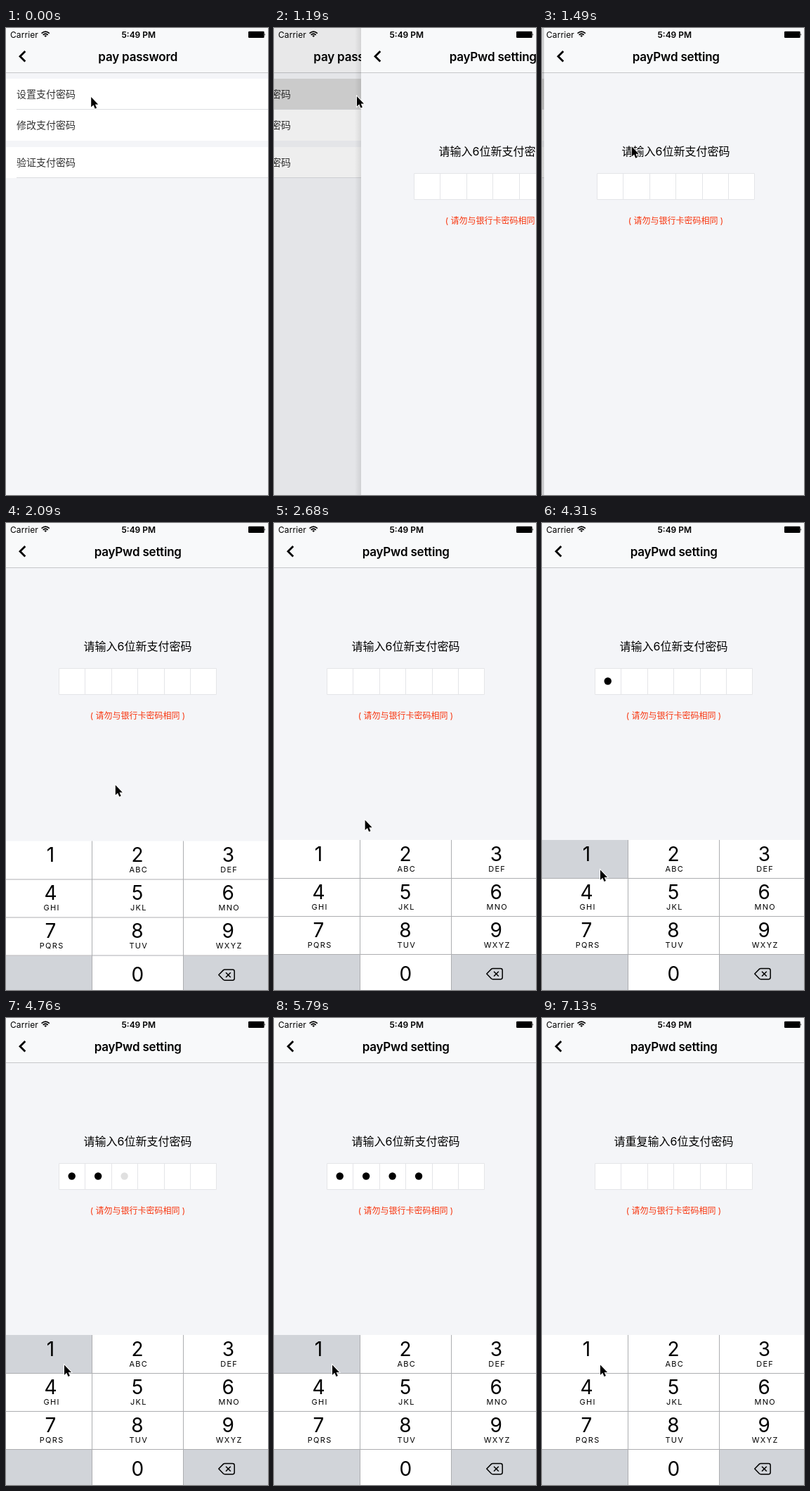
These frames come from a looping animation (373x663 px, 8000 ms). An HTML page:

```html
<!DOCTYPE html>
<html lang="zh-CN">
<head>
<meta charset="utf-8">
<title>pay password</title>
<style>
html, body { margin: 0; width: 100%; height: 100%; overflow: hidden; background: #f4f5f8; }
svg { display: block; width: 373px; height: 663px; }
text { font-family: Inter, "Noto Sans CJK SC", "Noto Sans CJK", sans-serif; fill: #000; }
.mid { text-anchor: middle; }
.title { font-size: 17px; font-weight: 600; letter-spacing: -.2px; }
.status { font-size: 12px; }
.row { font-size: 14px; fill: #333; }
.prompt { font-size: 16px; }
.note { font-size: 12px; fill: #f8350e; }
.digit { font-size: 28px; }
.abc { font-size: 11px; letter-spacing: 1.3px; }
.line { stroke: #dcdde0; fill: none; }
.cell { stroke: #e4e5e8; fill: none; }
.grid { stroke: #adaeb1; fill: none; }
</style>
</head>
<body>
<svg viewBox="0 0 373 663">
  <defs>
    <linearGradient id="shade"><stop offset="0" stop-opacity="0"/><stop offset="1" stop-opacity=".09"/></linearGradient>
    <g id="bar">
      <rect width="373" height="63" fill="#f8f9fa"/>
      <rect y="63" width="373" height="1" fill="#c6c7ca"/>
      <path d="M27.3 33L20 40.3 27.3 47.6" fill="none" stroke="#000" stroke-width="2.8"/>
    </g>
  </defs>

  <g id="list">
    <rect width="373" height="663" fill="#f4f5f8"/>
    <use href="#bar"/>
    <text class="title mid" x="187.7" y="47">pay password</text>
    <path d="M0 72H373V160H0ZM0 169H373V213H0Z" fill="#fff"/>
    <rect id="hit" y="72" width="373" height="44" fill="#d9d9d9"/>
    <path class="line" d="M15 115.5H373M15 212.5H373"/>
    <text class="row" x="15" y="99">设置支付密码</text>
    <text class="row" x="15" y="143">修改支付密码</text>
    <text class="row" x="15" y="196">验证支付密码</text>
  </g>
  <rect id="dim" width="373" height="663"/>

  <g id="form">
    <rect x="-9" width="9" height="663" fill="url(#shade)"/>
    <rect width="373" height="663" fill="#f4f5f8"/>
    <use href="#bar"/>
    <text class="title mid" x="187.7" y="47">payPwd setting</text>
    <text class="prompt mid" id="prompt" x="187.5" y="181"></text>
    <rect x="75" y="206" width="225" height="38" fill="#fff"/>
    <path class="cell" d="M75.5 206.5H299.5V243.5H75.5ZM112.5 207V243M150.5 207V243M187.5 207V243M225.5 207V243M262.5 207V243"/>
    <g id="dots"></g>
    <text class="note mid" x="187.5" y="278">( 请勿与银行卡密码相同 )</text>
  </g>

  <g id="pad">
    <rect y="450" width="373" height="220" fill="#fff"/>
    <path d="M0 613H122V670H0ZM253 613H373V670H253Z" fill="#d1d4d9"/>
    <rect id="key" y="450" width="122" height="54" fill="#d1d4d9"/>
    <path class="grid" d="M0 504.5H373M0 558.5H373M0 612.5H373M122.5 450V670M252.5 450V670"/>
    <g id="keys"></g>
    <g fill="none" stroke="#000" stroke-width="1.5">
      <path d="M302.8 640L309.3 633.4Q310.2 632.5 311.5 632.5H322.5Q325.2 632.5 325.2 635.2V645Q325.2 647.7 322.5 647.7H311.5Q310.2 647.7 309.3 646.8Z" stroke-linejoin="round"/>
      <path d="M313 636.7L319.8 643.5M319.8 636.7L313 643.5"/>
    </g>
  </g>

  <text class="status" x="6" y="13.5" letter-spacing=".1">Carrier</text>
  <g fill="none" stroke="#000" stroke-width="1.7">
    <path d="M50.6 7.6Q56.2 2.6 61.8 7.6M52.7 9.8Q56.2 6.7 59.7 9.8"/>
    <path d="M54.3 11.1Q56.2 9.6 58.1 11.1L56.2 13Z" fill="#000" stroke="none"/>
  </g>
  <text class="status mid" x="188.8" y="13.5" font-weight="600">5:49 PM</text>
  <rect x="345" y="4.8" width="22.6" height="9.2" rx="1.2"/>
  <path d="M368.3 7.6Q370 9.4 368.3 11.2Z"/>

  <path id="cursor" d="M0 0V14.2L3.3 11.2 5.5 16.5 7.9 15.5 5.7 10.4H10Z" stroke="#fff" stroke-width="1.8" paint-order="stroke"/>
</svg>
<script>
const LOOP = 8000;
const $ = id => document.getElementById(id);
const make = (parent, tag, attrs, text = '') => {
  const el = document.createElementNS('http://www.w3.org/2000/svg', tag);
  for (const k in attrs) el.setAttribute(k, attrs[k]);
  el.textContent = text;
  return parent.appendChild(el);
};
const shift = (id, x, y) => $(id).setAttribute('transform', `translate(${x} ${y})`);
const show = (id, on) => $(id).setAttribute('visibility', on ? 'visible' : 'hidden');

// Screen refreshes: first, last, count
const steps = [0];
for (const [a, b, n] of [[150, 300, 2], [1190, 2090, 7], [2240, 3270, 8], [3420, 3570, 2]])
  for (let i = 0; i < n; i++) steps.push(Math.floor((a + (b - a) * i / (n - 1)) / 10) * 10);

// Cursor stops: time, x, y
const path = [
  [0, 121.2, 98], [150, 119.5, 97.6], [300, 118, 97], [1190, 118, 97],
  [2090, 155.8, 372], [2240, 155.8, 372], [3270, 89, 499], [3420, 86, 496], [3570, 83, 492.5]
];
const presses = [[4020, 4320], [4470, 4610], [4760, 5060], [5500, 5640], [5790, 6090]];
const typed = [4020, 4470, 4760, 5500, 5940, 6380];

const letters = ['', 'ABC', 'DEF', 'GHI', 'JKL', 'MNO', 'PQRS', 'TUV', 'WXYZ'];
letters.forEach((abc, i) => {
  const col = i % 3, y = 480 + 54 * Math.floor(i / 3);
  make($('keys'), 'text', { class: 'digit mid', x: [63.5, 187, 316.3][col], y }, i + 1);
  make($('keys'), 'text', { class: 'abc mid', x: [65.2, 188.8, 317.7][col], y: y + 15 }, abc);
});
make($('keys'), 'text', { class: 'digit mid', x: 187.4, y: 649.5 }, 0);

const dots = typed.map((_, i) => make($('dots'), 'circle', { cx: 93.7 + 37.45 * i, cy: 224.5, r: 5.2 }));

const decay = (t, start, rate) => t < start ? 1 : Math.exp(-rate * (t - start) / 1000);

function cursorAt(t) {
  const i = path.findIndex(p => p[0] > t);
  if (i < 0) return path[path.length - 1].slice(1);
  const [t0, x0, y0] = path[i - 1], [t1, x1, y1] = path[i];
  const u = (t - t0) / (t1 - t0), e = u * u * (3 - 2 * u);
  return [x0 + (x1 - x0) * e, y0 + (y1 - y0) * e];
}

function draw(t) {
  const s = steps.filter(v => v <= t).pop();

  const left = decay(s, 1100, 12.23);
  shift('form', Math.round(373 * left), 0);
  shift('list', -Math.round(112 * (1 - left)), 0);
  $('dim').setAttribute('opacity', 0.1 * (1 - left));
  show('form', left < 1);
  show('hit', left < 1);

  const drop = 213.5 * decay(s, 1680, 12.1);
  shift('pad', 0, drop < 1 ? 0 : drop);
  show('pad', s > 1680);
  show('key', presses.some(([a, b]) => t >= a && t < b));

  const keep = t < 6980 ? 1 : t < 7130 ? 0.4 : 0;
  dots.forEach((dot, i) => {
    const age = t - typed[i];
    dot.setAttribute('opacity', age < 0 ? 0 : age < 140 ? 0.12 : keep);
  });
  $('prompt').textContent = t < 6530 ? '请输入6位新支付密码' : '请重复输入6位支付密码';

  shift('cursor', ...cursorAt(s));
}

const start = performance.now();
function tick() {
  draw((performance.now() - start) % LOOP);
  requestAnimationFrame(tick);
}
tick();
</script>
</body>
</html>
```
